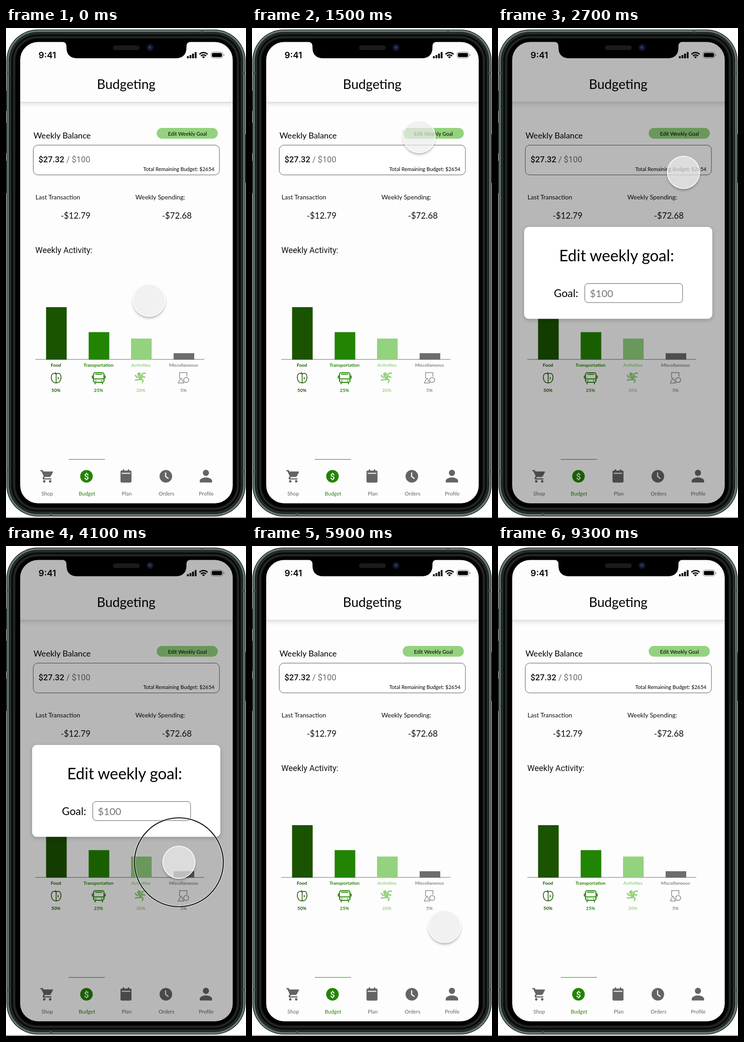
Recreate the animation shown at these times as an HTML page. Size 524 by 1069 pixels, loop 9.5 s.

```html
<!DOCTYPE html>
<html lang="en">
<head>
<meta charset="utf-8">
<title>Budgeting</title>
<style>
  html, body { margin: 0; width: 100%; height: 100%; overflow: hidden; background: #fff; }
  svg { display: block; width: 100%; height: 100%; }
  text { font-family: Lato, "Open Sans", sans-serif; }
  .roboto { font-family: Roboto, Arial, sans-serif; }
  .mid { text-anchor: middle; }
  .label { font: 700 10px Roboto, Arial, sans-serif; text-anchor: middle; }
  .line { fill: none; stroke: currentColor; stroke-linecap: round; stroke-linejoin: round; }
</style>
</head>
<body>
<svg viewBox="0 0 524 1069" xmlns="http://www.w3.org/2000/svg">
  <defs>
    <clipPath id="screen"><rect x="31" y="30.5" width="464" height="1006.5" rx="39"/></clipPath>
    <linearGradient id="fall" x2="0" y2="1">
      <stop stop-color="#000" stop-opacity=".13"/>
      <stop offset=".4" stop-color="#000" stop-opacity=".05"/>
      <stop offset="1" stop-color="#000" stop-opacity="0"/>
    </linearGradient>
    <filter id="soft" x="-30%" y="-30%" width="160%" height="160%"><feGaussianBlur stdDeviation="2.6"/></filter>
    <filter id="softer" x="-10%" y="-10%" width="120%" height="125%"><feGaussianBlur stdDeviation="5"/></filter>
    <mask id="outsideDisc">
      <rect x="-60" y="-60" width="120" height="120" fill="#fff"/><circle r="35.5"/>
    </mask>
  </defs>

  <!-- phone body -->
  <path d="M0 1068H524" stroke="#4b4f4e"/>
  <g fill="#39453f">
    <path d="M0 137h3v44H0zM0 207h3v66H0zM0 290h3v70H0zM521 232h3v106h-3z"/>
  </g>
  <g id="shell"></g>
  <g fill="#4a5752">
    <path d="M425 3.5h6v6h-6zM95 1058.500h6v6h-6zM1.500 95h6v6h-6zM1.500 965h6v6h-6zM516.500 95h6v6h-6zM516.500 965h6v6h-6z"/>
  </g>

  <g clip-path="url(#screen)">
    <rect x="31" y="30" width="464" height="1008" fill="#fefdfe"/>
    <rect x="31" y="161" width="464" height="13" fill="url(#fall)"/>

    <!-- status bar -->
    <text x="71" y="66" font-size="19" font-weight="600" style="font-family:Inter,Arial,sans-serif">9:41</text>
    <path d="M395 61.500h4V66h-4zM400.700 59h4v7h-4zM406.300 56h4v10h-4zM412 52.500h4V66h-4z"/>
    <path class="line" style="stroke-linecap:butt" stroke-width="2.700" d="M422.500 57.500a12 12 0 0 1 17.500 0M425.700 61a7.500 7.500 0 0 1 11.100 0"/>
    <path d="M431.200 66.300l-3-3.100a4.300 4.300 0 0 1 6 0z"/>
    <rect x="447.500" y="52.500" width="26" height="13" rx="4" fill="none" stroke="#888"/>
    <rect x="449.500" y="54.500" width="22" height="9" rx="2.300"/>
    <path d="M475 57q2 .5 2 2t-2 2z" fill="#888"/>

    <text class="mid" x="262.500" y="132.500" font-size="28.500">Budgeting</text>

    <!-- balance -->
    <text x="60" y="240.500" font-size="18">Weekly Balance</text>
    <rect x="329" y="218" width="133.500" height="23.500" rx="11.750" fill="#93d27e"/>
    <text class="mid" x="396.200" y="234.500" font-size="11.300">Edit Weekly Goal</text>
    <rect x="59.500" y="255.500" width="406.500" height="65" rx="10" fill="#fff" stroke="#555"/>
    <text class="roboto" x="71" y="293" font-size="18" fill="#6e6b6e"><tspan font-weight="500" fill="#111">$27.32</tspan> / $100</text>
    <text x="455" y="312" font-size="11.300" text-anchor="end">Total Remaining Budget: $2654</text>

    <g fill="#111">
      <text x="64.500" y="373.500" font-size="13.800">Last Transaction</text>
      <text x="282.500" y="373.500" font-size="13.900">Weekly Spending:</text>
      <text x="119.500" y="416" font-size="18.500">-$12.79</text>
      <text x="340.500" y="416" font-size="18.500">-$72.68</text>
      <text class="roboto" x="64" y="491" font-size="18">Weekly Activity:</text>
    </g>

    <!-- chart -->
    <path d="M64 723H433" stroke="#9a989a" stroke-width="1.300"/>
    <g id="bars"></g>
    <g class="line" color="#1a5301" stroke-width="1.600">
      <path d="M109.500 755c-3-2.500-10-3-10.500 6-.3 8 4 14 10.500 13 7 1 10.800-5 10.500-13-.5-9-7.500-8.500-10.500-6zM109.500 774v-19q0-2-1.500-3.500M114 762v4"/>
    </g>
    <g class="line" color="#228403" stroke-width="2.200">
      <rect x="191" y="752" width="23" height="21" rx="4"/>
      <path d="M191 765.500h23M195.500 755.500h14M188.500 759v5M216.500 759v5M194.500 773.500v3M210.500 773.500v3M195.500 769.500h1M208.500 769.500h1"/>
    </g>
    <g class="line" color="#93d27e" stroke-width="3">
      <circle cx="290.500" cy="755.500" r="2.700" fill="currentColor"/>
      <path d="M282.500 758l3 4 9-1 4-7.500 6-.5M295 760.500l-4.500 6.500-8 1M294.500 765l5 4-2 4.500M303 762l-5-2" />
      <path d="M292 762l4 1-3 4z" stroke-width="4"/>
    </g>
    <g class="line" color="#8a888a" stroke-width="1.500">
      <path d="M379 764v-12.300h16V760M382 763.500l-6 11h12z"/>
      <circle cx="393.300" cy="768" r="5.500"/>
    </g>

    <!-- tab bar -->
    <path d="M137 941.300H216" stroke="#5dab49" stroke-width="1.600"/>
    <g fill="#656366">
      <path d="M75 964.500h5.300l1.500 3H102q1 .5.500 1.500l-4.800 9q-1 1.600-2.800 1.600H84.600l-1.300 2.800H99v2.600H82.500q-3.600-.6-2.300-3.800l2-3.500-4.900-10.600H75z"/>
      <circle cx="83.500" cy="989" r="2.700"/><circle cx="96.500" cy="989" r="2.700"/>
      <path d="M250 968q0-2.500 2.500-2.500h2.500V963h3v2.500h8V963h3v2.500h2.500q2.500 0 2.500 2.500v21q0 2.800-2.800 2.800h-18.400q-2.800 0-2.800-2.800z"/>
      <circle cx="349" cy="978" r="13.700"/>
      <circle cx="436.500" cy="970.500" r="6.700"/>
      <path d="M423 991.500v-3.500c0-5 8.500-7.500 13.500-7.500s13.500 2.500 13.500 7.500v3.500z"/>
    </g>
    <path d="M252.500 971.500h19" stroke="#fff" stroke-width="1.800"/>
    <path class="line" color="#fff" stroke-width="2.300" d="M348.500 970.500v8l5.500 4"/>
    <circle cx="175.700" cy="978" r="13.700" fill="#228403"/>
    <text class="mid roboto" x="175.700" y="984.500" font-size="18.500" font-weight="500" fill="#fff">$</text>
    <g id="tabs" font-size="11.400"></g>

    <!-- dialog -->
    <g id="dialog">
      <rect x="31" y="30" width="464" height="1008" opacity=".28"/>
      <rect x="57" y="437" width="411" height="200" rx="10" opacity=".22" filter="url(#softer)"/>
      <rect x="57" y="434" width="411" height="200.500" rx="10" fill="#fff"/>
      <text class="mid" x="259" y="509" font-size="34.200">Edit weekly goal:</text>
      <text x="122" y="587" font-size="23.300">Goal:</text>
      <rect x="189.500" y="557.500" width="213.500" height="41.500" rx="7" fill="#fff" stroke="#555"/>
      <text x="200.500" y="587" font-size="22" fill="#777">$100</text>
    </g>
  </g>

  <!-- notch -->
  <path d="M122 29.500Q132 31 132 39v3q0 24 24 24h214q24 0 24-24v-3q0-8 10-9.500z"/>
  <rect x="233.500" y="38" width="58.500" height="10" rx="5" fill="#1b1b1d"/>
  <circle cx="314.500" cy="42.500" r="7.800" fill="#12141f"/>
  <circle cx="314.500" cy="42.500" r="4.300" fill="#17294f"/>
  <circle cx="313.500" cy="41.500" r="1.400" fill="#33568f"/>

  <g id="pointer">
    <g id="ring" fill="none">
      <circle r="97" stroke="#fff" stroke-width="4.500" opacity=".65"/>
      <circle r="97" stroke="#111" stroke-width="2.200"/>
    </g>
    <g mask="url(#outsideDisc)"><circle cy="4" r="35.500" opacity=".27" filter="url(#soft)"/></g>
    <circle r="36" fill="#ededed" opacity=".7"/>
    <circle r="35.200" fill="none" stroke="#fff" stroke-width="1.800" opacity=".9"/>
  </g>
</svg>

<script>
const LOOP = 9500, STEP = 100;
const $ = id => document.getElementById(id);

// Nested outlines: inset, fill
$('shell').innerHTML = [
  [1, '#0f1513'], [2.5, '#72857e'], [5, '#46544e'], [7, '#141a18'], [9, '#303836'],
  [11, '#0b0d0c'], [16, '#2b2d2d'], [18.5, '#151616'], [21, '#000']
].map(([d, fill]) =>
  `<rect x="${d}" y="${d + 2.5}" width="${524 - 2 * d}" height="${1068 - 2 * d - 4}" rx="${69 - d}" fill="${fill}"/>`
).join('');

// Centre, top, name, share, bar colour, text colour
$('bars').innerHTML = [
  [110, 609, 'Food', 50, '#1a5301', '#1a5301'],
  [203, 663.5, 'Transportation', 25, '#228403', '#228403'],
  [295.5, 677.5, 'Activities', 20, '#93d27e', '#93d27e'],
  [388.5, 709.5, 'Miscellaneous', 5, '#6e6b6e', '#8a888a']
].map(([x, top, name, share, bar, ink]) =>
  `<rect x="${x - 22.5}" y="${top}" width="45" height="${723.5 - top}" fill="${bar}"/>
   <g class="label" fill="${ink}"><text x="${x - 1}" y="739">${name}</text>
   <text x="${x - 1}" y="794">${share}%</text></g>`
).join('');

$('tabs').innerHTML = ['Shop', 'Budget', 'Plan', 'Orders', 'Profile'].map((name, i) =>
  `<text class="mid" x="${90 + 86.8 * i}" y="1019.5" fill="${i === 1 ? '#228403' : '#656366'}">${name}</text>`
).join('');

// Pointer path: time, x, y
const path = [
  [0, 312.5, 594], [300, 312.5, 594], [1400, 365, 237], [2200, 365, 237],
  [2700, 405, 315], [3200, 416, 490], [3800, 377.5, 690], [5500, 377.5, 690],
  [5900, 420.5, 830], [6300, 441, 900], [LOOP, 441, 900]
];
const clicks = [1500, 3900];

const slope = (a, b, k) => (b[k] - a[k]) / (b[0] - a[0]);

function tangent(i, k) {
  if (i === 0 || i === path.length - 1) return 0;
  const before = slope(path[i - 1], path[i], k), after = slope(path[i], path[i + 1], k);
  return before * after <= 0 ? 0 : (before + after) / 2;
}

function along(t, k) {
  const i = path.findIndex((p, n) => n < path.length - 1 && t < path[n + 1][0]);
  const a = path[i], b = path[i + 1], d = b[0] - a[0], u = (t - a[0]) / d;
  const ease = u * u * (3 - 2 * u);
  return a[k] + (b[k] - a[k]) * ease
    + d * u * (1 - u) * ((1 - u) * tangent(i, k) - u * tangent(i + 1, k));
}

function render(ms) {
  const t = Math.floor((ms % LOOP) / STEP) * STEP;
  const since = Math.min(...clicks.map(c => t - c).filter(d => d >= 0), LOOP);
  const radius = 97 * Math.sqrt(Math.min(1, since / 200));
  $('dialog').style.display = t >= 1800 && t < 4200 ? '' : 'none';
  $('ring').style.display = since > 0 && since < 300 ? '' : 'none';
  for (const c of $('ring').children) c.setAttribute('r', radius);
  $('pointer').setAttribute('transform', `translate(${along(t, 1)} ${along(t, 2)})`);
  $('pointer').setAttribute('opacity', Math.max(0, Math.min(1, (7300 - t) / 300)));
}

const start = performance.now();
(function tick() {
  render(performance.now() - start);
  requestAnimationFrame(tick);
})();
</script>
</body>
</html>
```
